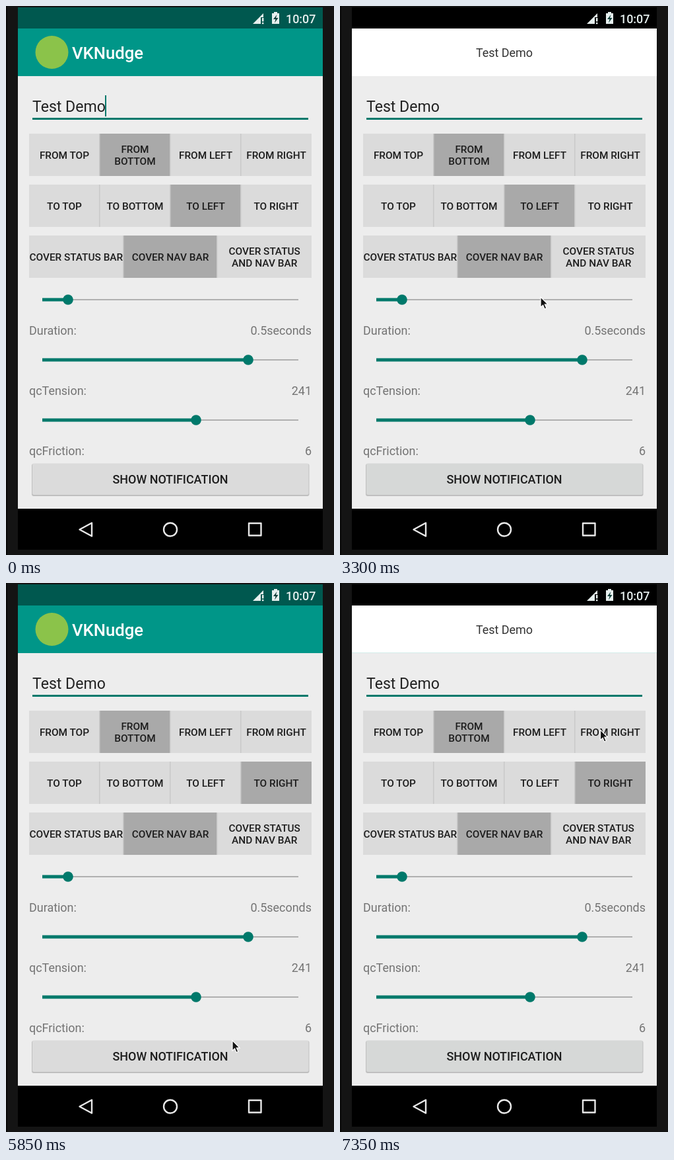
Write an HTML page that moves like this. It is 497x830 px and loops after 8000 ms.

```html
<!DOCTYPE html>
<html lang="en">
<head>
<meta charset="utf-8">
<title>Toast demo</title>
<style>
html, body { margin: 0; width: 100%; height: 100%; overflow: hidden; background: #141414; }
svg { display: block; width: 497px; height: 830px; font-family: Roboto, sans-serif; }
.caps { font-size: 15.4px; font-weight: 500; text-anchor: middle; fill: #1d1d1d; }
.label { font-size: 17.96px; fill: #747474; }
</style>
</head>
<body>
<svg id="stage" viewBox="0 0 497 830">
  <defs>
    <clipPath id="bar"><rect x="18" y="34" width="462" height="72"/></clipPath>
  </defs>
  <rect width="497" height="830" fill="#141414"/>
  <path d="M1 0V830" stroke="#080808" stroke-width="2"/>
  <rect x="18" y="2" width="462" height="820"/>
  <rect x="18" y="106" width="462" height="654" fill="#ededed"/>
  <rect id="status" x="18" y="2" width="462" height="32"/>

  <g fill="#e6efee">
    <path d="M374 27L390 11V17H386V27Z"/>
    <path d="M388 18h2.4v5.5H388zM388 25h2.4v2.2H388z"/>
    <path d="M406 9h5v2h3v16h-11V11h3z"/>
    <text x="469.5" y="25.5" font-size="17.96" font-weight="500" text-anchor="end">10:07</text>
  </g>
  <path d="M410.500 13L405 20H408.500L407 25.500L412.500 18H409Z" fill="#123f3a"/>

  <rect x="18" y="34" width="462" height="72" fill="#009688"/>
  <circle cx="69.500" cy="70" r="25" fill="#8bc34a"/>
  <text x="100" y="80" font-size="25.67" font-weight="500" fill="#fff">VKNudge</text>

  <g clip-path="url(#bar)">
    <g id="toast">
      <rect x="18" y="34" width="462" height="72" fill="#fff"/>
      <text x="249" y="77" font-size="17.96" fill="#333" text-anchor="middle">Test Demo</text>
    </g>
  </g>

  <text x="40" y="160" font-size="23.1" fill="#222">Test Demo</text>
  <rect x="40" y="169" width="418" height="3" fill="#00796b"/>
  <rect id="caret" x="150" y="135" width="2" height="32" fill="#00796b"/>

  <g id="controls"></g>

  <rect x="39" y="692" width="420.500" height="49" rx="3" fill="#bfbfbf"/>
  <rect id="show" x="40" y="691.500" width="418.500" height="47.500" rx="2.500"/>
  <text class="caps" x="249" y="722" style="font-size:17.96px">SHOW NOTIFICATION</text>

  <g fill="none" stroke="#e8e8e8" stroke-width="2.400" stroke-linejoin="round">
    <path d="M111.500 791.500L130 781.500V801.500Z"/>
    <circle cx="249" cy="791.500" r="10"/>
    <rect x="368" y="782" width="18.500" height="18.500"/>
  </g>
  <path id="cursor" d="M0 0V15.500L3.600 12.200L6 18L8.800 16.800L6.300 11.200H11Z" fill="#111" stroke="#fff" stroke-width="1.200"/>
</svg>
<script>
const LOOP = 8000, STEP = 150;
const $ = id => document.getElementById(id);
const controls = $('controls');

function add(tag, attrs, text = '') {
  const node = document.createElementNS('http://www.w3.org/2000/svg', tag);
  for (const key in attrs) node.setAttribute(key, attrs[key]);
  node.textContent = text;
  controls.append(node);
  return node;
}

function buttonRow(y, labels) {
  const width = 428 / labels.length;
  return labels.map((label, i) => {
    const x = 35 + i * width;
    const cell = add('rect', { x: Math.round(x), y, width: Math.round(width), height: 64 });
    if (i) add('rect', { x: Math.round(x) - 1, y, width: 1.5, height: 64, fill: '#c9c9c9' });
    const lines = label.split('|');
    lines.forEach((line, j) => add('text', {
      class: 'caps', x: x + width / 2, y: y + 38 + (j - (lines.length - 1) / 2) * 18
    }, line));
    return cell;
  });
}

function slider(y, thumb, label, value) {
  add('rect', { x: 55, y: y - 0.5, width: 388, height: 1, fill: '#747474' });
  add('rect', { x: 55, y: y - 2.5, width: thumb - 55, height: 5, fill: '#00796b' });
  add('circle', { cx: thumb, cy: y, r: 7.8, fill: '#00796b' });
  add('text', { class: 'label', x: 35, y: y + 53 }, label);
  add('text', { class: 'label', x: 463, y: y + 53, 'text-anchor': 'end' }, value);
}

const select = (cells, active) =>
  cells.forEach((cell, i) => cell.setAttribute('fill', i === active ? '#a9a9a9' : '#dbdbdb'));

const fromRow = buttonRow(193, ['FROM TOP', 'FROM|BOTTOM', 'FROM LEFT', 'FROM RIGHT']);
const toRow = buttonRow(270, ['TO TOP', 'TO BOTTOM', 'TO LEFT', 'TO RIGHT']);
const coverRow = buttonRow(347, ['COVER STATUS BAR', 'COVER NAV BAR', 'COVER STATUS|AND NAV BAR']);
select(fromRow, 1);
select(coverRow, 1);
slider(444, 94, 'Duration:', '0.5seconds');
slider(535, 367, 'qcTension:', '241');
slider(626, 288, 'qcFriction:', '6');

// time, x, y of the pointer tip
const pointer = [
  [900, 380, 798], [1050, 330, 745], [1200, 305, 730], [1650, 305, 730],
  [2250, 298, 506], [2400, 298, 506], [2700, 304, 440], [3300, 304, 440],
  [3900, 310.5, 320], [4200, 290, 557], [4500, 279, 756], [4950, 441.5, 312],
  [5100, 441.5, 312], [5550, 369, 623], [6000, 330, 726], [6150, 330, 726],
  [6450, 375.5, 286], [7200, 394.5, 222], [LOOP, 394.5, 222]
];

function pointerAt(t) {
  const i = pointer.findIndex(key => key[0] > t);
  const [t0, x0, y0] = pointer[i - 1], [t1, x1, y1] = pointer[i];
  const p = (t - t0) / (t1 - t0);
  return [x0 + (x1 - x0) * p, y0 + (y1 - y0) * p];
}

const within = (t, ...spans) => spans.some(([a, b]) => t >= a && t < b);
const ramp = (t, start, length) => Math.min(1, Math.max(0, (t - start) / length));

// Underdamped spring from 1 to 0
function spring(ms) {
  if (ms <= 0) return 1;
  const s = ms / 1000, decay = 9.5, freq = 29.4;
  return Math.exp(-decay * s) * (Math.cos(freq * s) + decay / freq * Math.sin(freq * s));
}

function draw(t) {
  const enter = t < 5000 ? 2036 : 6773;
  const leave = 3505;
  const dx = t < 5000 ? -462 * (1 - spring(t - leave)) : 0;
  const dy = 72 * spring(t - enter);
  $('toast').setAttribute('transform', `translate(${dx.toFixed(2)} ${dy.toFixed(2)})`);
  $('toast').style.display = within(t, [enter, 4300], [6773, LOOP]) ? '' : 'none';

  const light = 1 - ramp(t, 1550, 260) + ramp(t, 4300, 450) - ramp(t, 6250, 260);
  $('status').setAttribute('fill', `rgb(0,${Math.round(88 * light)},${Math.round(79 * light)})`);

  $('caret').style.display =
    within(t, [0, 430], [900, 1430], [5240, 5740], [6240, 6350]) ? '' : 'none';
  select(toRow, t < 5250 ? 2 : 3);

  const shade = within(t, [6300, 6900], [1600, 2150]) ? '#cdcfce'
    : within(t, [1200, 4900], [6900, LOOP]) ? '#d6d8d7' : '#dbdbdb';
  $('show').setAttribute('fill', shade);

  const visible = t >= 900;
  $('cursor').style.display = visible ? '' : 'none';
  if (visible) $('cursor').setAttribute('transform', `translate(${pointerAt(t)})`);
}

// The screen refreshes in coarse steps
function tick() {
  const t = performance.now() % LOOP;
  draw(Math.floor(t / STEP) * STEP);
  requestAnimationFrame(tick);
}
tick();
</script>
</body>
</html>
```
